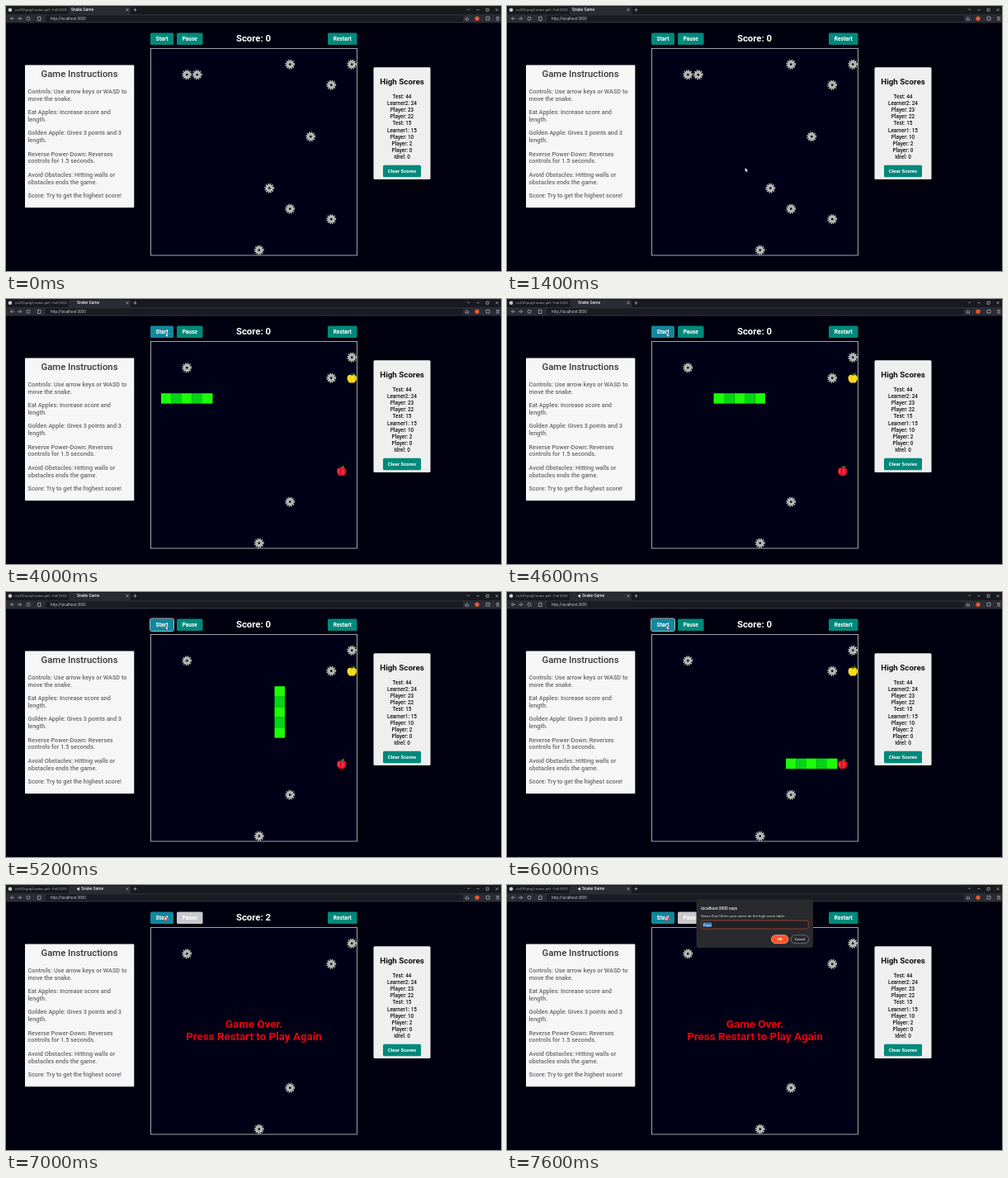
Recreate the animation shown at these times as an HTML page. Size 600 by 321 pixels, loop 8 s.

```html
<!DOCTYPE html>
<html lang="en">
<head>
<meta charset="utf-8">
<title>Snake Game</title>
<style>
html, body { margin: 0; width: 100%; height: 100%; overflow: hidden; background: #00000f; }
svg { display: block; width: 600px; height: 321px; font-family: Roboto, Inter, sans-serif; }
.mid { text-anchor: middle; }
.line { fill: none; stroke: #b9bac0; stroke-width: .7; }
</style>
</head>
<body>
<svg id="stage" viewBox="0 0 600 321">
  <defs>
    <g id="gear">
      <circle r="5" fill="none" stroke="#bdbdb8" stroke-width="2" stroke-dasharray="1.4 1.218"/>
      <circle r="4.4" fill="#c6c6c0"/>
      <circle r="2.7" fill="none" stroke="#85857f" stroke-width=".8" stroke-dasharray="1.2 .9"/>
      <circle r="1.4" fill="#15151d"/>
    </g>
    <g id="apple">
      <path d="M0-3.2C3-5.2 6-3 5.7.6 5.4 3.8 3.2 6.2 1.4 6L0 5.5-1.4 6C-3.2 6.2-5.4 3.8-5.7.6-6-3-3-5.2 0-3.2Z"/>
      <path d="M-3-2Q-4.6 0-3 3M1-2Q2.2 0 1 4" fill="none" stroke="#fff" stroke-opacity=".35" stroke-width=".9"/>
      <path d="M0-3Q0-6 3.4-6.3 3.2-3.4 0-3Z" fill="#2c9a2c"/>
      <path d="M0-3L-1-6" stroke="#6b4522" stroke-width="1"/>
    </g>
  </defs>

  <!-- Browser bar -->
  <rect width="600" height="10" fill="#191a20"/>
  <rect y="10" width="600" height="10.5" fill="#2a2c34"/>
  <path d="M76 10V3Q76 1 78 1H149Q151 1 151 3V10Z" fill="#2a2c34"/>
  <rect x="48" y="11.5" width="506" height="7.5" rx="2" fill="#1b1c23"/>
  <circle cx="5" cy="4.7" r="2.3" fill="#c9cacf"/>
  <circle cx="571" cy="15.2" r="2.6" fill="#f2552c"/>
  <g class="line">
    <path d="M10 15.2H5.500M7.500 13.200L5.500 15.200 7.500 17.200M14 15.200H18.500M16.500 13.200L18.500 15.200 16.500 17.200"/>
    <circle cx="27" cy="15.200" r="2"/>
    <path d="M38.500 13.200H42V17.500H38.500Z"/>
    <path d="M145.500 3.200L148.500 6.200M148.500 3.200L145.500 6.200M154.500 4.700H158.500M156.500 2.700V6.700"/>
    <path d="M557 17H560.500V14.500M557 17V14.500M558.700 15.500V13"/>
    <path d="M582 13.300H586V17H582ZM594 13.500H598M594 15.200H598M594 17H598"/>
    <path d="M559 3.500L560.500 5 562 3.500M570.500 4.700H573.500M582 3.200H585V6.200H582ZM593.500 3.200L596.500 6.200M596.500 3.200L593.500 6.200"/>
  </g>
  <path id="speaker" d="M86 4H87L89 2.500V7L87 5.600H86Z" fill="#ddd"/>
  <g id="page"></g>
  <rect x="175.5" y="51.5" width="250" height="250.500" fill="#000017" stroke="#b4b4bd" stroke-width=".9"/>
  <g id="idle"></g>
  <g id="gears"></g>
  <g id="food">
    <use id="gold" href="#apple" fill="#f8d80c"/>
    <use id="red" href="#apple" fill="#e3122a"/>
  </g>
  <g id="snake"></g>
  <g id="over"></g>
  <g id="dialog">
    <rect x="229.500" y="17.500" width="141.500" height="58.500" rx="3" fill="#292a2e"/>
    <rect x="235.300" y="43" width="130" height="10" rx="1.500" fill="#202124" stroke="#a8452f" stroke-width=".8"/>
    <rect x="237.500" y="45.300" width="10.500" height="5.600" fill="#3c76b8"/>
    <rect id="ok" x="320.500" y="60.700" width="20.500" height="10" rx="5" fill="#fb542b" stroke="#ffa48c"/>
    <rect x="344.300" y="60.700" width="21.500" height="10" rx="5" fill="none" stroke="#85868c" stroke-width=".7"/>
  </g>
  <path id="cursor" d="M0 0V5.200L1.300 4.200 2.200 6 3 5.600 2.200 3.800 3.800 3.700Z" fill="#fff" stroke="#111" stroke-width=".4"/>
  <g id="blocked" transform="translate(193.500 41)">
    <circle r="2.100" fill="#fff" stroke="#e02828" stroke-width="1"/>
    <path d="M-1.400-1.400L1.400 1.400" stroke="#e02828" stroke-width=".9"/>
  </g>
</svg>
<script>
const NS = 'http://www.w3.org/2000/svg';
const $ = id => document.getElementById(id);
const CELL = 12.5, LEFT = 175.5, TOP = 52;
const TEAL = '#00897b';

function add(parent, tag, attrs, text = '') {
  const el = document.createElementNS(NS, tag);
  for (const k in attrs) el.setAttribute(k, attrs[k]);
  el.textContent = text;
  return $(parent).appendChild(el);
}
const write = (parent, text, x, y, size, fill, weight = 500, cls = '') =>
  add(parent, 'text', { x, y, 'font-size': size, fill, 'font-weight': weight, class: cls }, text);
const box = (x, y, width, height, fill, rx = 1.5) =>
  add('page', 'rect', { x, y, width, height, fill, rx });
function button(label, x, y, w, size) {
  const rect = box(x, y, w, 14.5, TEAL);
  write('page', label, x + w / 2, y + 9.5, size, '#fff', 700, 'mid');
  return rect;
}
const place = (el, col, row) => el.setAttribute('transform',
  `translate(${LEFT + CELL * (col + .5)} ${TOP + CELL * (row + .5)})`);
const show = (id, on) => $(id).style.display = on ? '' : 'none';

write('page', 'cs410-proj2-notes.pdf - Fall 2023', 11, 6.300, 4.300, '#a9aab0', 400);
const tab = write('page', 'Snake Game', 79, 6.300, 4.800, '#e6e6ea');
write('page', 'http://localhost:3000', 54, 17, 4.600, '#c4c5cc', 400);

const start = button('Start', 175, 32.5, 28, 6.700);
const ring = add('page', 'rect', { x: 174.500, y: 32, width: 29, height: 15.500, rx: 2, fill: 'none', stroke: '#d5e4f2', 'stroke-width': .8 });
const pause = button('Pause', 207, 32.5, 31.5, 6.500);
button('Restart', 390, 32.5, 35.5, 6.700);
const score = write('page', '', 300, 43.200, 11.400, '#fff', 700, 'mid');

box(23, 71.5, 132.300, 172.700, '#f6f6f6', 1);
write('page', 'Game Instructions', 89, 86, 11.300, '#36363a', 500, 'mid');
[
  ['Controls: Use arrow keys or WASD to', 'move the snake.'],
  ['Eat Apples: Increase score and', 'length.'],
  ['Golden Apple: Gives 3 points and 3', 'length.'],
  ['Reverse Power-Down: Reverses', 'controls for 1.5 seconds.'],
  ['Avoid Obstacles: Hitting walls or', 'obstacles ends the game.'],
  ['Score: Try to get the highest score!']
].forEach((lines, i) => lines.forEach((s, j) =>
  write('page', s, 26.5, 106 + i * 25.200 + j * 8.800, 7.300, '#68686c')));

box(445.500, 74.300, 69, 135.700, '#efefef');
write('page', 'High Scores', 480, 95, 9.800, '#111', 700, 'mid');
['Test: 44', 'Learner2: 24', 'Player: 23', 'Player: 22', 'Test: 15', 'Learner1: 15',
  'Player: 10', 'Player: 2', 'Player: 0', 'Idrel: 0']
  .forEach((s, i) => write('page', s, 480, 111.800 + i * 8.170, 6.400, '#111', 500, 'mid'));
button('Clear Scores', 457, 192.800, 46, 6);

const gears = (group, cells) =>
  cells.forEach(([c, r]) => place(add(group, 'use', { href: '#gear' }), c, r));
gears('idle', [[4, 2], [13, 1], [15, 8], [11, 13], [17, 16]]);
gears('gears', [[3, 2], [19, 1], [17, 3], [13, 15], [10, 19]]);
place($('gold'), 19, 3);
place($('red'), 18, 12);

write('over', 'Game Over.', 300.500, 172.500, 13.400, '#f00008', 700, 'mid');
write('over', 'Press Restart to Play Again', 300.500, 188.300, 13.400, '#f00008', 700, 'mid');

write('dialog', 'localhost:3000 says', 235.300, 30, 4.900, '#eee');
write('dialog', 'Game Over! Enter your name for the high score table:', 235.300, 39, 4.350, '#ddd', 400);
write('dialog', 'Player', 238, 49.600, 3.700, '#fff', 400);
write('dialog', 'OK', 330.700, 67.300, 4.300, '#fff', 700, 'mid');
write('dialog', 'Cancel', 355, 67.300, 4.100, '#ddd', 500, 'mid');

const body = Array.from({ length: 6 }, (_, i) => add('snake', 'rect',
  { width: CELL, height: CELL, fill: i % 2 ? '#04d414' : '#1cfb08' }));

// Right along row 5, down column 12, right along row 12
function cellAt(n) {
  if (n <= 7) return [5 + n, 5];
  return n <= 14 ? [12, n - 2] : [n - 2, 12];
}

function draw(now) {
  const t = Math.floor(now % 8000 / 200) * 200;
  const playing = t >= 4000 && t < 6400, ended = t >= 6400, ate = t >= 6200;

  show('idle', t < 4000);
  show('food', playing);
  show('red', !ate);
  show('snake', playing);
  show('over', ended);
  show('blocked', ended);
  show('dialog', t >= 7200);
  show('speaker', t >= 5600);
  $('ok').setAttribute('stroke-width', t >= 7600 ? .8 : 0);
  tab.setAttribute('x', t < 4000 ? 79 : t < 5600 ? 86 : 91);
  score.textContent = 'Score: ' + (ate ? 2 : 0);
  start.setAttribute('fill', t >= 2200 ? '#12879d' : TEAL);
  pause.setAttribute('fill', ended ? '#cacace' : TEAL);
  ring.style.display = t >= 4800 && playing ? '' : 'none';

  show('cursor', t >= 1400 && !ended);
  const left = (1 - Math.min(1, Math.max(0, (t - 1400) / 1000))) ** 2;
  $('cursor').setAttribute('transform', `translate(${193.500 + 95 * left} ${40.800 + 155 * left})`);

  const head = Math.floor((t - 4000) / 105);
  body.forEach((seg, i) => {
    const [c, r] = cellAt(head - i);
    seg.setAttribute('x', LEFT + c * CELL);
    seg.setAttribute('y', TOP + r * CELL - .3);
    seg.style.display = i < 5 || ate ? '' : 'none';
  });
}

function loop() {
  draw(performance.now());
  requestAnimationFrame(loop);
}
loop();
</script>
</body>
</html>
```
